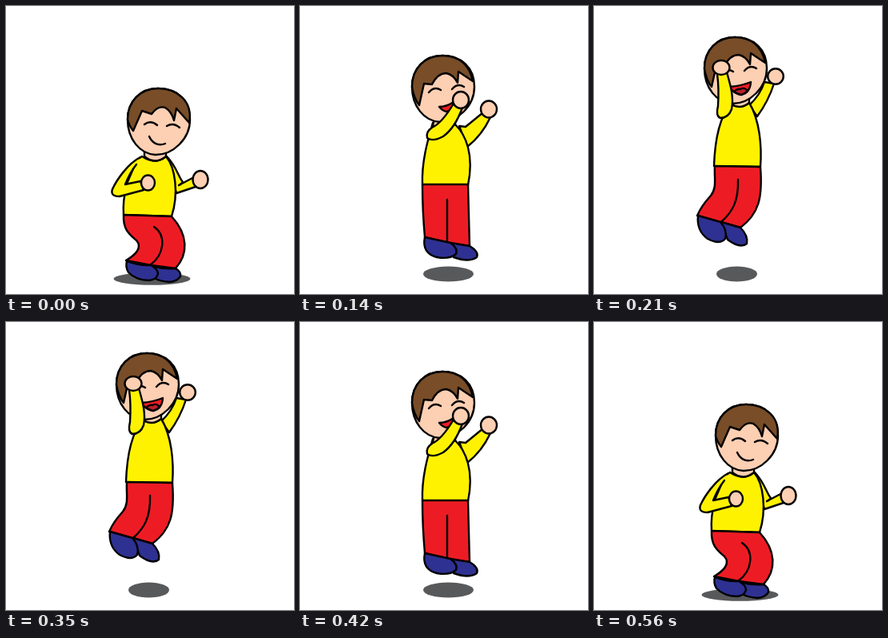
These frames come from a looping animation (360x360 px, 0.77 s). An HTML page:

```html
<!DOCTYPE html>
<html lang="en">
<head>
<meta charset="utf-8">
<title>Jumping boy</title>
<style>
  html, body { margin: 0; width: 100%; height: 100%; overflow: hidden; background: #fff; }
  svg { display: block; width: 100%; height: 100%; }
</style>
</head>
<body>
<svg id="stage" viewBox="0 0 360 360" stroke="#000" stroke-width="2.4" stroke-linejoin="round" stroke-linecap="round"></svg>
<script>
const SKIN = '#fdcfb3', HAIR = '#784d28', YELLOW = '#fff200', RED = '#ed1c24', BLUE = '#2e3192', GREY = '#58595b';
const STEP = 70, LOOP = 770;

const HEAD = 'M190 103C168 103 152 119 152 142C152 166 167 185 187 186C209 186 230 166 230 142C230 118 214 103 190 103Z';
const SMILE = 'M179 163C182 170 189 176 199 172';
const lowered = {
  hair: 'M159 156L170 131L182 135Q190 124 199 127Q207 132 210 143L213 128L229 146C234 119 214 103 190 103C168 103 152 119 152 142Q154 150 159 156Z',
  eyes: 'M173 148Q181 142 189 149M201 150Q209 145 217 152'
};
const raised = {
  hair: 'M161 165L167 138L177 139Q184 125 195 125Q204 127 209 137L210 123L228 135C224 114 210 103 190 103C168 103 152 119 152 142Q154 156 161 165Z',
  eyes: 'M173 149Q180 141 188 146M202 145Q209 137 217 142'
};

// Ellipses are [cx, cy, rx, ry]; head is an offset for the shared head shapes.
const crouch = {
  shadow: [182.5, 341, 48, 7.8], head: [0, 0], face: lowered,
  backArm: 'M201 188C213 200 216 215 221 220Q219 223 216 224L235 214L240 225L213 234Z', backHand: [243, 217, 9.5, 11],
  torso: 'M170 188Q187 199 200 188C212 202 216 235 207 263L147 261C146 245 148 238 151 222L164 192Z',
  neck: 'M173 180V188Q186 199 200 188V180',
  trousers: 'M147 261C146 280 155 286 163 293C171 302 162 311 150 318L181 324L212 328C228 310 228 286 207 263Z',
  seam: 'M185 276C200 286 199 310 180 324',
  backShoe: 'M186 326Q198 329 212 328Q219 332 218 338Q213 345 204 345Q193 344 187 341Z',
  frontShoe: 'M151 319Q167 325 181 324Q190 329 190 335Q188 342 179 343Q163 343 153 333Q149 326 151 319Z',
  frontArm: 'M168 189C152 197 138 218 133 229Q130 238 142 238L172 230L168 219L149 223Q155 208 163 198', frontHand: [177.5, 221, 8.5, 9.5]
};

const stand = {
  shadow: [183, 340, 42, 8], head: [-7, -19], face: lowered,
  backArm: 'M200 176C209 188 214 191 219 190L241 172L248 182C239 197 226 207 211 211Z', backHand: [250, 172, 10, 11],
  torso: 'M167 169Q181 180 195 169C209 183 216 218 209 246L150 245C149 215 155 190 165 172Z',
  neck: 'M167 161V169Q180 179 194 169V161',
  trousers: 'M150 245C150 265 160 279 158 291Q157 304 154 314L186 320L212 322C218 300 217 275 209 246Z',
  seam: 'M184 262Q192 294 186 320',
  backShoe: 'M187 322L212 322Q222 329 220 337Q210 344 191 339Z',
  frontShoe: 'M155 314L186 318Q195 325 194 333Q188 340 173 338Q148 335 155 314Z',
  frontArm: 'M165 174C154 185 145 198 144 209Q149 217 162 212L192 191L186 181L163 194L168 183', frontHand: [193, 180, 9.5, 10]
};

const rise = {
  shadow: [185.5, 335, 31.5, 9.5], head: [-12, -41], face: raised,
  mouth: 'M174 126Q183 126 192 120Q191 131 183 132Q178 131 174 126Z',
  backArm: 'M199 150L207 151L229 133L238 139C231 154 222 166 209 176Z', backHand: [236, 129, 10, 10.5],
  torso: 'M166 146Q180 152 194 148C207 161 218 185 210 224L153 223C152 195 159 170 166 146Z',
  neck: 'M168 140L166 150Q181 155 194 148V140',
  trousers: 'M153 223H210L212 300L187 297L156 289Q153 255 153 223Z',
  seam: 'M184 242V295',
  backShoe: 'M188 296L212 300Q224 307 221 314Q211 321 192 314Z',
  frontShoe: 'M156 289L188 296Q198 303 195 310Q187 317 171 314Q152 309 156 289Z',
  frontArm: 'M192 122C183 137 174 148 165 152Q157 157 159 165Q166 170 179 163C190 155 198 141 203 127Z', frontHand: [201, 117.5, 10, 10.5]
};

const float = {
  shadow: [178.5, 335, 25.5, 9.5], head: [-14, -64], face: raised,
  mouth: 'M169 101Q184 100 196 95Q195 109 184 111Q174 109 169 101Z', tongue: 'M175 107Q179 103 183 104Q188 101 192 106Q188 110 184 111Q179 110 175 107Z',
  backArm: 'M194 124Q208 111 213 95L225 97Q218 119 204 138Z', backHand: [227, 88, 9.8, 9.8],
  torso: 'M171 122Q182 130 194 121C207 142 210 175 208 201L150 200C151 170 156 140 171 122Z',
  neck: 'M172 115V123Q183 130 194 121V115',
  trousers: 'M151 200C150 215 154 227 146 237Q134 250 129 262L158 270L183 277C206 260 211 240 208 201Z',
  seam: 'M180 217C181 245 172 258 160 269',
  backShoe: 'M159 270L183 277Q193 287 191 297Q183 304 167 292Z',
  frontShoe: 'M130 262L158 270Q167 280 164 291Q157 299 142 291Q128 281 130 262Z',
  frontArm: 'M154 85L166 83C171 100 175 115 172 129Q168 140 158 140Q152 138 155 125C156 110 156 100 154 85Z', frontHand: [159, 77, 10.5, 9]
};

const peak = {
  shadow: [179, 335, 17.5, 9.5], head: [-14, -89], face: raised,
  mouth: 'M172 72Q185 71 197 64Q195 84 184 87Q177 84 172 72Z', tongue: 'M178 83Q183 73 194 76Q191 84 184 87Q181 86 178 83Z',
  backArm: 'M190 95L213 60Q215 85 207 97Q202 104 195 105Z', backHand: [214.5, 50, 9, 9.5],
  torso: 'M169 102Q182 111 195 102C207 116 210 150 209 176L151 176C150 150 158 115 169 102Z',
  neck: 'M169 95V103Q182 112 196 102V94',
  trousers: 'M150 176C150 190 154 199 145 203Q133 210 115 211L136 227L156 242C186 232 207 218 209 195V176Z',
  seam: 'M178 189C178 210 158 222 136 227',
  backShoe: 'M137 227L157 241Q164 255 161 263Q152 270 140 252Z',
  frontShoe: 'M115 211Q123 214 136 227Q143 240 138 250Q130 255 119 243Q106 226 115 211Z',
  frontArm: 'M137 67L146 61C156 72 167 86 169 103Q170 112 163 113Q155 112 152 102C148 90 143 78 137 67Z', frontHand: [135, 57.5, 11, 9.5]
};

const sequence = [crouch, stand, rise, float, peak, float, rise, stand, crouch];

const path = (d, fill = 'none') => d ? `<path d="${d}" fill="${fill}"/>` : '';
const oval = ([cx, cy, rx, ry], fill, extra = '') =>
  `<ellipse cx="${cx}" cy="${cy}" rx="${rx}" ry="${ry}" fill="${fill}" ${extra}/>`;

const drawHead = p => `<g transform="translate(${p.head})">`
  + path(HEAD, SKIN) + path(p.face.hair, HAIR) + path(p.face.eyes) + (p.mouth ? '' : path(SMILE)) + '</g>'
  + path(p.mouth, RED) + path(p.tongue, '#be1e2d');

const drawPose = p => oval(p.shadow, GREY, 'stroke="none"')
  + path(p.backArm, YELLOW) + oval(p.backHand, SKIN)
  + path(p.torso, YELLOW) + path(p.neck, SKIN)
  + path(p.trousers, RED) + path(p.seam)
  + path(p.backShoe, BLUE) + path(p.frontShoe, BLUE)
  + drawHead(p)
  + path(p.frontArm, YELLOW) + oval(p.frontHand, SKIN);

const stage = document.getElementById('stage');
const start = performance.now();
let shown;

function render() {
  const time = (performance.now() - start) % LOOP;
  const pose = sequence[Math.min(Math.floor(time / STEP), sequence.length - 1)];
  if (pose !== shown) stage.innerHTML = drawPose(shown = pose);
  requestAnimationFrame(render);
}
render();
</script>
</body>
</html>
```
